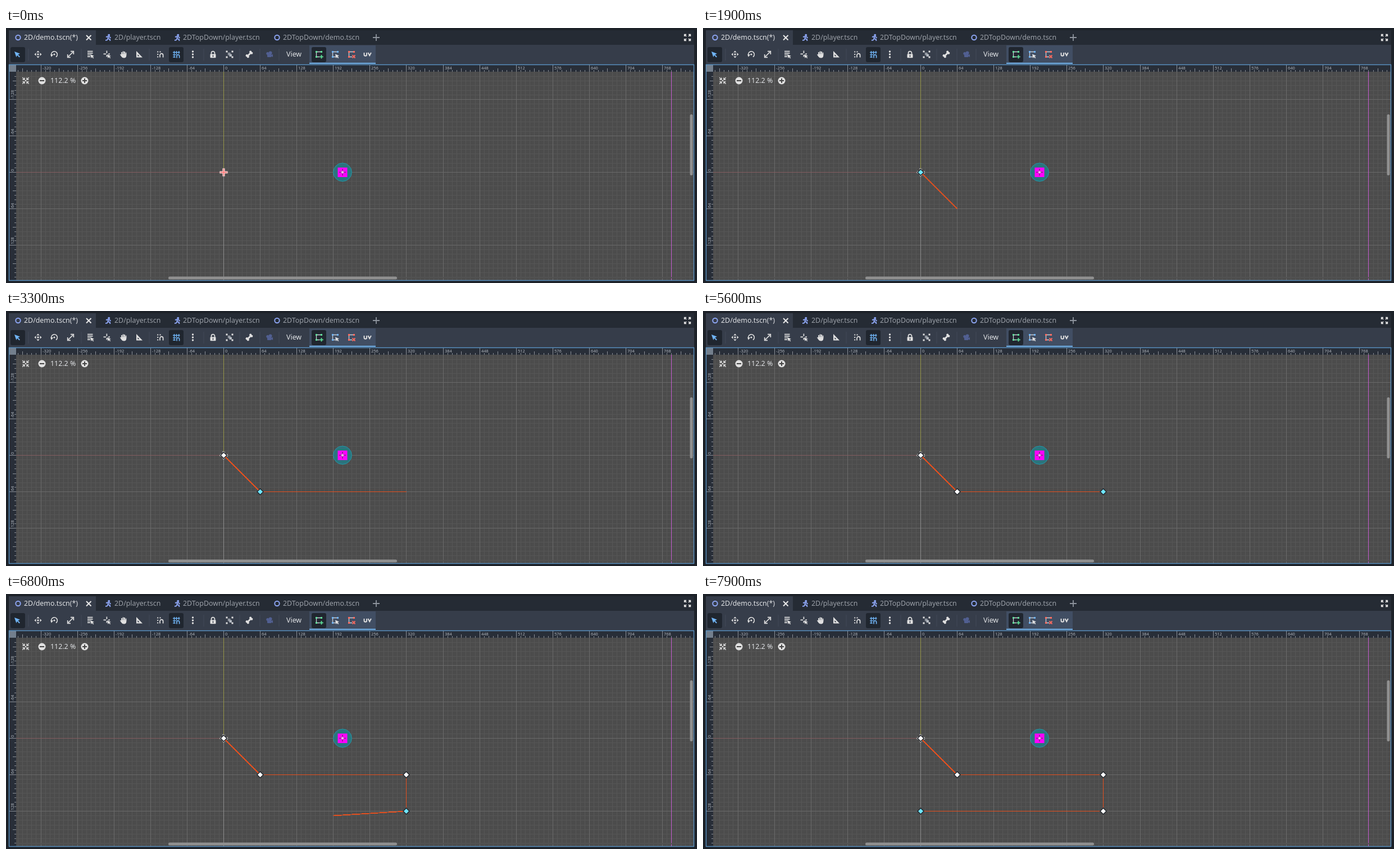
Recreate the animation shown at these times as an HTML page. Size 1230x455 px, loop 8000 ms.

```html
<!DOCTYPE html>
<html lang="en">
<head>
<meta charset="utf-8">
<title>Polygon editing</title>
<style>
  html, body { margin: 0; width: 1230px; height: 455px; overflow: hidden; background: #1d2229; }
  svg { display: block; }
  text { font-family: "Noto Sans", "Open Sans", sans-serif; font-size: 12.4px; fill: #9ba0a8; }
  .lit { fill: #e0e2e5; }
  .ruler { font-size: 7.5px; fill: #aeb3ba; }
  .crisp { shape-rendering: crispEdges; }
  .line { fill: none; stroke: #e0e0e0; stroke-width: 1.7; }
  .solid { fill: #e0e0e0; }
</style>
</head>
<body>
<svg id="stage" width="1230" height="455" viewBox="0 0 1230 455"></svg>
<script>
const ZOOM = 1.0171;
const ORIGIN = { x: 387, y: 257 };
const LOOP = 8000;
const stage = document.getElementById('stage');

const px = u => Math.floor(ORIGIN.x + .5 + u * ZOOM);
const py = u => Math.floor(ORIGIN.y + .5 + u * ZOOM);
const rect = (x, y, w, h, fill, extra = '') =>
  `<rect x="${x}" y="${y}" width="${w}" height="${h}" fill="${fill}" ${extra}/>`;
const path = (d, attrs = 'class="line"') => `<path d="${d}" ${attrs}/>`;
const disc = (x, y, r, attrs = 'class="solid"') => `<circle cx="${x}" cy="${y}" r="${r}" ${attrs}/>`;
const text = (x, y, s, cls = '') => `<text x="${x}" y="${y}" class="${cls}">${s}</text>`;
const at = (x, y, body) => `<g transform="translate(${x} ${y})">${body}</g>`;
const fill = c => `fill="${c}"`;
const stroke = (c, w = 1.7) => `fill="none" stroke="${c}" stroke-width="${w}"`;

function drawPanels() {
  return rect(5, 4, 1220, 26, '#252b34') +
    rect(5, 4, 155, 26, '#363d4a') +
    rect(5, 30, 1220, 35, '#363d4a') +
    rect(540, 31, 118, 33, '#414e63') +
    rect(540, 62, 118, 2, '#70b0e8') +
    [39.5, 133.5, 254.5, 351.5, 415.5, 451.5, 485.5]
      .map(x => rect(x, 37, 1, 21, '#434b59')).join('');
}

function drawTabs() {
  const ring = x => disc(x, 17, 4.2, stroke('#8da5f3', 2));
  const runner = x => at(x, 17,
    disc(1.2, -4.2, 2, fill('#8da5f3')) +
    path('M-4 -1 L-1 -1.8 L2 -1.2 L4.5 .8 M0 -1 L-.6 2 L2.8 3 L3.5 6 M-.6 2 L-2 4.4 L-5 5',
      stroke('#8da5f3', 2)));
  const corner = a => `<g transform="rotate(${a})">` +
    path('M2 -2 L5 -5 M2 -5.3 H5.3 V-2') + '</g>';
  return ring(21.5) + text(32, 21, '2D/demo.tscn(*)', 'lit') +
    path('M143 13 l8.5 8.5 m0 -8.5 l-8.5 8.5', stroke('#e8e8e8', 2)) +
    runner(182) + text(193, 21, '2D/player.tscn') +
    runner(305) + text(315, 21, '2DTopDown/player.tscn') +
    ring(482.5) + text(493, 21, '2DTopDown/demo.tscn') +
    path('M653 17 h12 m-6 -6 v12', stroke('#8e949d', 1.8)) +
    at(1213, 17, [0, 90, 180, 270].map(corner).join(''));
}

function drawTools() {
  const pressed = x => rect(x, 34, 26, 27, '#20262f', 'rx="3"');
  const icon = (x, body) => at(x, 47, body);
  const blue = '#70b4f5';
  const arrow = 'M-5 -5 L5 -1.2 L1.4 .4 L5 4 L3.6 5.5 L0 1.8 L-1.6 5 Z';
  const dot = (x, y, c = '#e0e0e0', s = 3) => rect(x - s / 2, y - s / 2, s, s, c);
  const corners = (c, r = 4.5) => [[-r, -r], [r, -r], [r, r], [-r, r]].map(p => dot(...p, c)).join('');
  const polygon = c => path('M-4.5 -4.5 H4.5 M-4.5 -4.5 V4.5 H1', stroke('#c9ced6', 1.3)) +
    [[-4.5, -4.5], [4.5, -4.5], [-4.5, 4.5]].map(p => dot(...p, c)).join('');

  return pressed(8) + icon(20, path(arrow, fill(blue))) +
    icon(57, path('M0 -6.5 l2.7 3 h-5.4z M0 6.5 l2.7 -3 h-5.4z M-6.5 0 l3 -2.7 v5.4z M6.5 0 l-3 -2.7 v5.4z', 'class="solid"') +
      disc(0, 0, 1.7)) +
    icon(86, path('M-4.8 2.4 A5.3 5.3 0 1 1 3 4.5') + path('M-6.8 .2 h5 l-3.4 4.6z', 'class="solid"') + disc(0, 0, 1.6)) +
    icon(115, path('M-4 4 L4 -4 M0 -5.3 H5.3 V0 M-5.3 0 V5.3 H0')) +
    icon(150, path('M-5 -5.4 H4.5 M-5 -2.2 H4.5 M-5 1 H0 M-5 4.2 H0') +
      path('M0 -.5 L7 3 L4.2 4 L6.4 6.5 L5 7.3 L3 5 L1.6 7 Z', 'class="solid"')) +
    icon(180, path('M-6.5 -.6 H-2 M-.6 -6.5 V-2 M-.6 1 V4.5 M2 -.6 H5') +
      path('M0 0 L7 3 L4.2 4 L6.4 6.5 L5 7 L3 5 L1.6 7 Z', 'class="solid"')) +
    icon(209, path('M-2.9 1 V-4 M-.4 0 V-5.5 M2 0 V-5 M4.4 1 V-3.3', stroke('#e0e0e0', 1.9)) +
      path('M-3.8 -.5 H5.3 V2.5 Q5 6.5 1 6.5 Q-2 6.5 -3.5 4.2 L-6 .5 L-5 -.6 L-3.8 .8Z', 'class="solid"')) +
    icon(237, path('M-5 -6 L6 5.6 H-5Z M-2.6 0 V3.3 H.6Z', 'class="solid" fill-rule="evenodd"')) +
    icon(275, path('M-1 5.5 V1.5 A2.8 2.8 0 0 1 4.6 1.5 V5.5') + dot(-4.8, -4.5, '#e0e0e0', 2) +
      dot(-4.8, 0, '#e0e0e0', 2) + dot(-.5, -4.5, '#e0e0e0', 2) + dot(-4.8, 4.5, '#e0e0e0', 2)) +
    pressed(290) + icon(303, path('M-3.5 -6 V6 M.5 -6 V0 M4.8 -6 V-1 M-6 -3.5 H6.5 M-6 .8 H0 M-6 4.8 H-1', stroke(blue, 1.3)) +
      path('M1 6.5 V3 A2.3 2.3 0 0 1 5.6 3 V6.5', stroke(blue))) +
    icon(332.5, [-5, 0, 5].map(y => disc(0, y, 1.7)).join('')) +
    icon(368.5, rect(-5, -.5, 10, 6.8, '#e0e0e0', 'rx="1"') + path('M-3 0 V-2.3 A3 3 0 0 1 3 -2.3 V0') + rect(-.8, 1.5, 1.6, 3, '#363d4a')) +
    icon(398, corners('#e0e0e0', 5) + rect(-3.2, -3.2, 4.8, 4.8, '#8f959e') + rect(-.5, -.5, 4.4, 4.4, '#b7bcc4')) +
    icon(433, path('M-3 3 L3 -3', stroke('#e0e0e0', 3)) +
      [[-4.3, 2.2], [-2.2, 4.3], [2.2, -4.3], [4.3, -2.2]].map(p => disc(...p, 2.1)).join('')) +
    icon(469, rect(-4, -1, 7.5, 6, '#515f91', 'rx="1"') + disc(-3.2, -1.5, 2.5, fill('#515f91')) +
      disc(1.5, -2.6, 3, fill('#515f91')) + path('M3 1.5 L6 -.5 V5 L3 3Z', fill('#515f91'))) +
    text(499, 51, 'View', 'lit') +
    pressed(544) + icon(557, polygon('#5fe09a') + path('M4.5 1 V7.5 M1.2 4.3 H7.8', stroke('#5fe09a', 1.8))) +
    icon(586, polygon('#70b4f5') + path('M0 -.5 L7 2.5 L4.3 3.7 L6.5 6.2 L5 7 L3 5 L1.6 7 Z', 'class="solid"')) +
    icon(615, polygon('#ff6b5f') + path('M1.5 1.5 L6.5 6.5 M6.5 1.5 L1.5 6.5', stroke('#ff6b5f', 1.8))) +
    icon(643.5, path('M-6 -3 V.5 A2.3 2.3 0 0 0 -1.4 .5 V-3 M1 -3 L3.7 2.2 L6.4 -3', stroke('#e0e0e0', 1.9)));
}

function drawGrid() {
  let minor = '', major = '';
  for (let i = -46; i <= 103; i++) {
    const d = `M${px(i * 8) + .5} 78V450`;
    if (px(i * 8) > 18 && px(i * 8) < 1224) i % 8 ? minor += d : major += d;
  }
  for (let i = -22; i <= 23; i++) {
    const d = `M18 ${py(i * 8) + .5}H1224`;
    if (py(i * 8) > 78 && py(i * 8) < 450) i % 8 ? minor += d : major += d;
  }
  return rect(18, 78, 1206, 372, '#4c4c4c') + '<g class="crisp">' +
    path(minor, stroke('#565656', 1)) + path(major, stroke('#6a6a6a', 1)) +
    rect(18, ORIGIN.y, 369, 1, '#835d60') +
    rect(ORIGIN.x, 78, 1, 179, '#949449') +
    rect(ORIGIN.x, 258, 1, 192, '#8c8c8c') +
    rect(1184, 78, 1, 372, '#c65cd0') + '</g>';
}

function drawRulers() {
  let ticks = '', labels = '';
  const size = i => i % 8 === 0 ? 12 : i % 4 === 0 ? 6 : 3;
  for (let i = -45; i <= 102; i++) {
    const x = px(i * 8);
    if (x < 19) continue;
    ticks += `M${x + .5} 78v${-size(i)}`;
    if (i % 8 === 0) labels += text(x + 3, 74.3, i * 8, 'ruler');
  }
  for (let i = -21; i <= 23; i++) {
    const y = py(i * 8);
    if (y < 80 || y > 449) continue;
    ticks += `M18 ${y + .5}h${-size(i)}`;
    if (i % 8 === 0) labels += `<g transform="translate(14.3 ${y - 1}) rotate(-90)">${text(0, 0, i * 8, 'ruler')}</g>`;
  }
  return rect(6, 66, 1218, 12, '#282e38') + rect(6, 66, 12, 384, '#282e38') +
    path(ticks, stroke('#8b9098', 1) + ' class="crisp"') + labels +
    rect(6, 66, 12, 12, '#737f8d');
}

function drawOverlay() {
  const inward = a => `<g transform="rotate(${a})">` + path('M2 -5.5 V-2 H5.5 M2.2 -2.2 L5.8 -5.8', stroke('#e0e0e0', 1.3)) + '</g>';
  return at(35, 94, [0, 90, 180, 270].map(inward).join('') + disc(0, 0, 1.3)) +
    disc(64, 94, 6.5) + rect(60, 93, 8, 2, '#444') +
    text(79, 98, '112.2 %', 'lit') +
    disc(140, 94, 6.5) + path('M136 94 h8 m-4 -4 v8', stroke('#444', 2)) +
    rect(20, 444.5, 1190, 2, '#505050') +
    rect(289, 443.5, 407, 5, '#909090', 'rx="2.5"') +
    rect(1217.5, 154, 5, 109, '#909090', 'rx="2.5"') +
    rect(5.5, 65.5, 1219, 385, 'none', 'stroke="#5a93c4" stroke-width="1.4"');
}

function drawPlayer() {
  return at(599, 257.3,
    disc(0, 0, 16.3, 'fill="#2b747d" stroke="#1f9aaa"') +
    rect(-8.5, -8.3, 17, 17, '#ff00ff') +
    path('M0 -6 V-3 M0 3 V6 M-6 0 H-3 M3 0 H6', stroke('#86248c', 1.8)) +
    disc(0, 0, 2.4, 'fill="#f6b5f3" stroke="#a04aa5" stroke-width=".8"'));
}

stage.innerHTML = drawPanels() + drawTabs() + drawTools() + drawGrid() + drawPlayer() +
  drawRulers() + drawOverlay() + '<g id="shape"></g>';
const shape = document.getElementById('shape');

// Polygon corners in canvas units, in the order they are placed.
const CORNERS = [[0, 0], [64, 64], [320, 64], [320, 128], [0, 128]];

// Time, number of placed corners, loose end of the line (snapped to 8 units).
const STEPS = [
  [0, 0], [1100, 1],
  [1500, 1, 8, 8], [1600, 1, 24, 24], [1700, 1, 40, 40], [1800, 1, 56, 56], [1900, 1, 64, 64],
  [2300, 2],
  [2500, 2, 88, 64], [2600, 2, 160, 72], [2700, 2, 240, 72], [2800, 2, 304, 72],
  [2900, 2, 312, 72], [3000, 2, 320, 72], [3300, 2, 320, 64],
  [5600, 3],
  [5800, 3, 328, 72], [5900, 3, 336, 88], [6000, 3, 336, 104], [6100, 3, 328, 112],
  [6200, 3, 328, 120], [6300, 3, 320, 128],
  [6600, 4],
  [6700, 4, 272, 136], [6800, 4, 192, 136], [6900, 4, 80, 136], [7000, 4, -16, 136],
  [7100, 4, -56, 136], [7200, 4, -32, 128], [7300, 4, -8, 128], [7500, 4, 0, 128],
  [7800, 5]
];

const CROSS = 'M-1.5 -6.5 h3 v5 h5 v3 h-5 v5 h-3 v-5 h-5 v-3 h5z';

function drawShape([, count, tipX, tipY]) {
  const placed = CORNERS.slice(0, count);
  const line = tipX === undefined ? placed : [...placed, [tipX, tipY]];
  const points = line.map(([x, y]) => [px(x) + .5, py(y) + .5].join()).join(' ');
  const cross = count
    ? path(CROSS, 'fill="#333" stroke="#e8e8e8" stroke-width="1.1" stroke-dasharray="2 1"')
    : path(CROSS, 'fill="#ff7d7d" stroke="#ffd9d9" stroke-width="1.2"');
  const handles = placed.map(([x, y], i) => at(px(x) + .5, py(y) + .5,
    path('M0 -5.5 L5.5 0 L0 5.5 L-5.5 0Z',
      `fill="${i === count - 1 ? '#70e6ff' : '#fff'}" stroke="#20242a" stroke-width="1.3"`)));
  return at(ORIGIN.x + .5, ORIGIN.y + .5, cross) +
    `<polyline points="${points}" fill="none" stroke="#e5501f" stroke-width="1.8" class="${count > 1 ? 'crisp' : ''}"/>` +
    handles.join('');
}

let shown = null;
function tick() {
  const t = performance.now() % LOOP;
  const step = STEPS.findLast(s => s[0] <= t);
  if (step !== shown) {
    shown = step;
    shape.innerHTML = drawShape(step);
  }
  requestAnimationFrame(tick);
}
tick();
</script>
</body>
</html>
```
